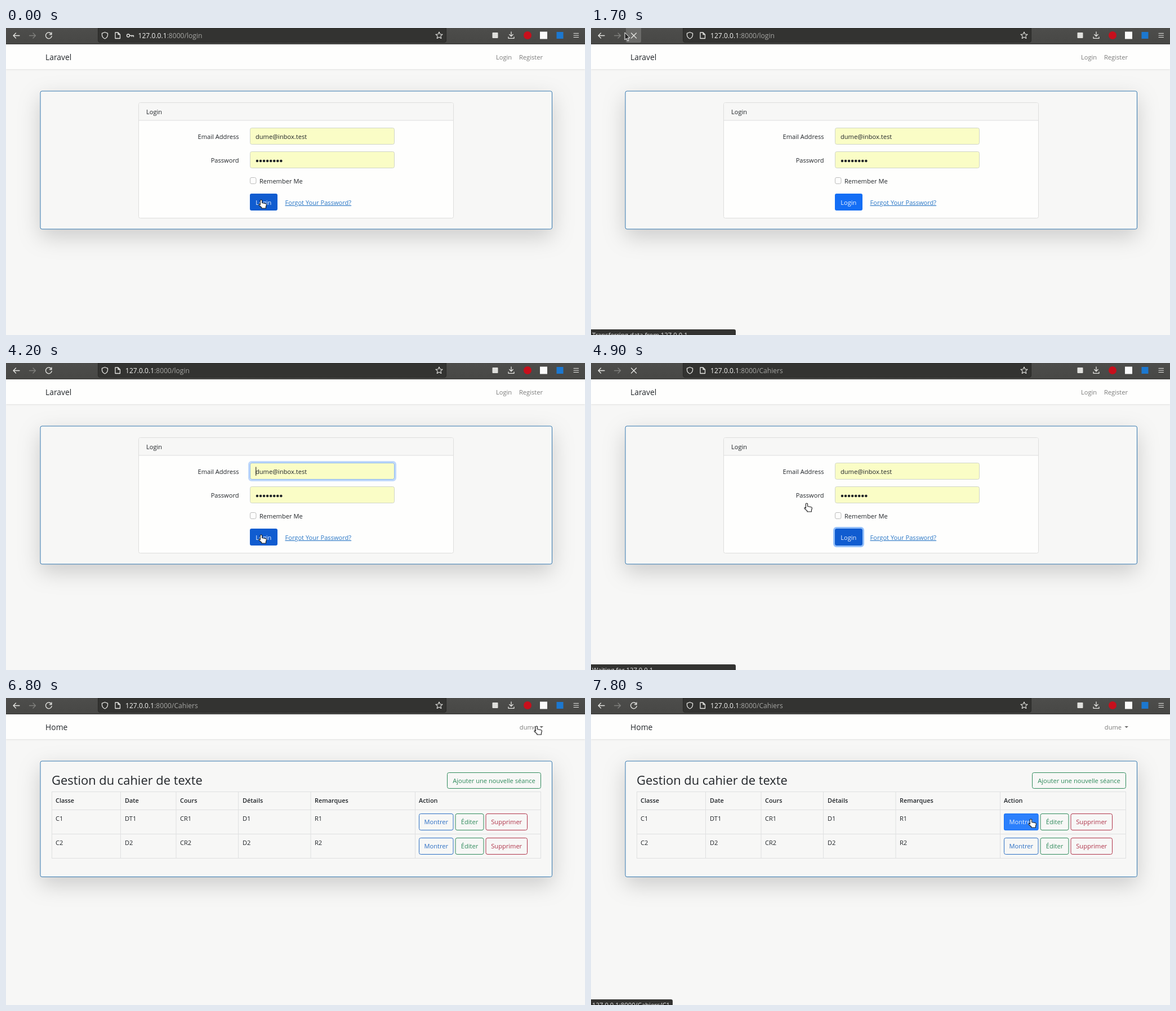
An HTML page that plays this animation: 1028x545 px, repeating every 8 s.

```html
<!DOCTYPE html>
<html lang="fr">
<head>
<meta charset="utf-8">
<title>Cahier de texte</title>
<style>
html, body { margin: 0; width: 100%; height: 100%; overflow: hidden; background: #f7f7f6; }
svg { display: block; width: 100vw; height: 100vh; }
text { font: 11.1px "Open Sans", "Noto Sans", sans-serif; fill: #212529; white-space: pre; }
.mid { text-anchor: middle; }
.end { text-anchor: end; }
.brand { font-size: 13.9px; }
.muted { fill: #7b7b7a; }
.title { font-size: 21.9px; }
.heads text { font-size: 10.9px; font-weight: 600; }
.url { font-size: 12.1px; fill: #a5a5a2; }
.url tspan { fill: #f4f4f2; }
.status text { font-size: 11.3px; fill: #eee; }
.status rect { fill: #333331; }
.line { fill: none; stroke: #e6e6e3; stroke-width: 1.3; stroke-linecap: round; stroke-linejoin: round; }
.card { fill: #f7f7f6; stroke: #3578b0; filter: drop-shadow(0 13px 19px rgba(0,0,0,.175)); }
.field { fill: #fafdc6; stroke: #d0d5c8; }
.grid { fill: none; stroke: #dfe0e1; }
.blue { --c: #2c6fc4; --f: #0d6efd; }
.green { --c: #2f8a5b; --f: #198754; }
.red { --c: #b0344a; --f: #dc3545; }
.btn rect { fill: none; stroke: var(--c); }
.btn text { fill: var(--c); }
.btn .fill rect { fill: var(--f); stroke: none; }
.btn .fill text { fill: #fff; }

/* One loop is 8 s; 1.25% is one 100 ms step. */
.a { animation: 8s step-end infinite; }
@keyframes login-page { 0% { opacity: 1 } 62.5%, 100% { opacity: 0 } }
@keyframes home-page { 0% { opacity: 0 } 62.5%, 100% { opacity: 1 } }
@keyframes url-key { 0% { opacity: 1 } 18.75%, 100% { opacity: 0 } }
@keyframes url-login { 0% { opacity: 0 } 18.75% { opacity: 1 } 57.5%, 100% { opacity: 0 } }
@keyframes url-home { 0% { opacity: 0 } 57.5%, 100% { opacity: 1 } }
@keyframes reload { 0% { opacity: 1 } 18.75% { opacity: 0 } 28.75% { opacity: 1 } 55% { opacity: 0 } 71.25%, 100% { opacity: 1 } }
@keyframes stop { 0% { opacity: 0 } 18.75% { opacity: 1 } 28.75% { opacity: 0 } 55% { opacity: 1 } 71.25%, 100% { opacity: 0 } }
@keyframes glow { 0% { opacity: 0 } 16.25% { opacity: 1 } 25%, 100% { opacity: 0 } }
@keyframes waiting { 0% { opacity: 0 } 18.75% { opacity: 1 } 20% { opacity: 0 } 55% { opacity: 1 } 62.5%, 100% { opacity: 0 } }
@keyframes transfer { 0% { opacity: 0 } 20% { opacity: 1 } 28.75% { opacity: 0 } 62.5% { opacity: 1 } 67.5%, 100% { opacity: 0 } }
@keyframes link-add { 0% { opacity: 0 } 78.75% { opacity: 1 } 81.25% { opacity: 0 } 91.25% { opacity: .1 } 92.5%, 100% { opacity: 0 } }
@keyframes link-show { 0% { opacity: 0 } 96.25%, 100% { opacity: 1 } }
@keyframes focus { 0% { opacity: 0 } 28.75% { opacity: 1 } 53.75%, 100% { opacity: 0 } }
@keyframes submit { 0% { fill: #105cd0 } 3.75% { fill: #1266e4 } 5% { fill: #146ef5 } 41.25%, 100% { fill: #105cd0 } }
@keyframes submit-ring { 0% { opacity: 0 } 53.75%, 100% { opacity: 1 } }
@keyframes add { 0% { opacity: 0 } 76.25% { opacity: .3 } 77.5% { opacity: .9 } 78.75% { opacity: 1 } 80% { opacity: .4 } 81.25% { opacity: 0 } 91.25% { opacity: .12 } 92.5%, 100% { opacity: 0 } }
@keyframes show { 0% { opacity: 0 } 95% { opacity: .25 } 96.25% { opacity: .65 } 97.5%, 100% { opacity: .87 } }
@keyframes hand {
  0% { opacity: 1 } 3.75% { opacity: 0 } 41.25% { opacity: 1 } 62.5% { opacity: 0 }
  76.25% { opacity: 1 } 80% { opacity: 0 } 82.5% { opacity: 1 } 87.5% { opacity: 0 }
  91.25% { opacity: 1 } 92.5% { opacity: 0 } 95%, 100% { opacity: 1 }
}
@keyframes arrow {
  0% { opacity: 0 } 3.75% { opacity: 1 } 6.25% { opacity: 0 } 8.75% { opacity: 1 } 35% { opacity: 0 }
  37.5% { opacity: 1 } 41.25% { opacity: 0 } 62.5% { opacity: 1 } 76.25% { opacity: 0 } 80% { opacity: 1 }
  82.5% { opacity: 0 } 87.5% { opacity: 1 } 91.25% { opacity: 0 } 92.5% { opacity: 1 } 95%, 100% { opacity: 0 }
}
@keyframes beam { 0% { opacity: 0 } 6.25% { opacity: 1 } 8.75% { opacity: 0 } 35% { opacity: 1 } 37.5%, 100% { opacity: 0 } }
@keyframes pointer {
  0% { transform: translate(453px, 305px) }
  2.5% { transform: translate(453px, 305px); animation-timing-function: steps(3) }
  6.25% { transform: translate(239px, 15px) }
  7.5% { transform: translate(239px, 15px); animation-timing-function: steps(3) }
  11.25% { transform: translate(128px, 3px) }
  12.5% { transform: translate(128px, 3px); animation-timing-function: steps(4) }
  17.5% { transform: translate(75px, 12px) }
  20% { transform: translate(75px, 12px) }
  21.25% { transform: translate(60px, 8px) }
  23.75% { transform: translate(60px, 8px); animation-timing-function: steps(9) }
  35% { transform: translate(683px, 191px) }
  36.25% { transform: translate(512px, 231px); animation-timing-function: steps(4) }
  41.25% { transform: translate(453px, 305px) }
  56.25% { transform: translate(453px, 305px); animation-timing-function: steps(4) }
  61.25% { transform: translate(383px, 249px); animation-timing-function: steps(6) }
  68.75% { transform: translate(437px, 158px) }
  70% { transform: translate(437px, 158px); animation-timing-function: steps(2) }
  72.5% { transform: translate(780px, 124px) }
  73.75% { transform: translate(780px, 124px); animation-timing-function: steps(3) }
  77.5% { transform: translate(850px, 146px) }
  78.75% { transform: translate(850px, 146px); animation-timing-function: steps(3) }
  82.5% { transform: translate(957px, 60px); animation-timing-function: steps(2) }
  85% { transform: translate(942px, 50px); animation-timing-function: steps(4) }
  90% { transform: translate(905px, 128px) }
  91.25% { transform: translate(839px, 158px); animation-timing-function: steps(3) }
  95%, 100% { transform: translate(781px, 215px) }
}
</style>
</head>
<body>
<svg viewBox="0 0 1028 545">
  <defs>
    <linearGradient id="bar" x2="0" y2="1"><stop stop-color="#4d4d4b"/><stop offset="1" stop-color="#474745"/></linearGradient>
  </defs>
  <rect width="1028" height="545" fill="#f7f7f6"/>
  <rect y="29" width="1028" height="44" fill="#fefefd" style="filter:drop-shadow(0 1.6px 1.6px rgba(0,0,0,.09))"/>

  <!-- Browser bar -->
  <rect width="1028" height="29" fill="url(#bar)"/>
  <rect y="28" width="1028" height="1" fill="#393937"/>
  <path d="M163.5 0V22Q163.5 25.5 167 25.5H778Q781.5 25.5 781.5 22V0Z" fill="#333331" stroke="#282826"/>
  <rect class="a" style="animation-name:glow" x="62" y="-4" width="27" height="30" rx="3" fill="#6b6b69"/>
  <g class="line">
    <path d="M24 13.5H13M17.5 9L13 13.5L17.5 18"/>
    <path d="M41.5 13.5H52.5M48 9L52.5 13.5L48 18" stroke="#80807d"/>
    <path class="a" style="animation-name:reload" d="M80.5 10.5A5.4 5.4 0 1 0 81.2 14.5M81 8V11.5H77.5"/>
    <path class="a" style="animation-name:stop" d="M71.5 9L80.5 18M80.5 9L71.5 18"/>
    <path d="M175.5 7.5L180.5 9.3V12.5Q180.2 17 175.5 19Q170.8 17 170.5 12.5V9.3Z"/>
    <path d="M194 8H199L202.5 11.5V18.5H194ZM199 8V11.5H202.5"/>
    <path class="a" style="animation-name:url-key" d="M219.5 13.5A2.5 2.5 0 1 0 214.5 13.5A2.5 2.5 0 1 0 219.5 13.5H226.5V15.5M223.5 13.5V15"/>
    <path d="M769 7L770.8 11L775 11.4L771.8 14.2L772.8 18.5L769 16.2L765.2 18.5L766.2 14.2L763 11.4L767.2 11Z" stroke-width="1.1"/>
    <path d="M897 7V14.5M893.8 11.5L897 14.7L900.2 11.5M892 16V18.3H902V16"/>
    <path d="M1008 9.5H1016.5M1008 13H1016.5M1008 16.5H1016.5" stroke-width="1.2"/>
  </g>
  <rect x="863.5" y="8" width="10" height="10" rx="1" fill="#dfdfdc"/>
  <circle cx="926" cy="13" r="7" fill="#c80f1c"/>
  <rect x="948" y="6.5" width="13" height="13" fill="#fafafa"/>
  <rect x="977.5" y="7" width="12" height="12" fill="#1c78d0"/>
  <text class="url a" style="animation-name:url-key" x="234.5" y="18"><tspan>127.0.0.1</tspan>:8000/login</text>
  <text class="url a" style="animation-name:url-login" x="212" y="18"><tspan>127.0.0.1</tspan>:8000/login</text>
  <text class="url a" style="animation-name:url-home" x="212" y="18"><tspan>127.0.0.1</tspan>:8000/Cahiers</text>

  <!-- Login page -->
  <g class="a" style="animation-name:login-page">
    <text class="brand" x="70" y="57">Laravel</text>
    <text class="muted" x="870" y="56">Login</text>
    <text class="muted" x="911" y="56">Register</text>
    <rect class="card" x="61" y="112" width="908.5" height="245" rx="3"/>
    <rect x="235.5" y="132.5" width="559" height="205" rx="3" fill="#fefefd" stroke="#dededd"/>
    <path d="M236 164V135.5Q236 133 238.5 133H791.5Q794 133 794 135.5V164Z" fill="#f7f7f6"/>
    <path d="M236 164H794" stroke="#dededd"/>
    <text x="249" y="153">Login</text>
    <text class="end" x="413.5" y="196.5">Email Address</text>
    <text class="end" x="413.5" y="239">Password</text>
    <rect class="field" x="433.5" y="177.5" width="256" height="29" rx="3"/>
    <rect class="field" x="433.5" y="219.5" width="256" height="29" rx="3"/>
    <g class="a" style="animation-name:focus" fill="none">
      <rect x="431.5" y="175.5" width="260" height="33" rx="4.5" stroke="#bfd8fb" stroke-width="3"/>
      <rect x="433.5" y="177.5" width="256" height="29" rx="3" stroke="#8bb8ee"/>
      <path d="M443.8 184.5V200" stroke="#111"/>
    </g>
    <text x="443" y="196.5">dume@inbox.test</text>
    <path d="M446 236H489" stroke="#212529" stroke-width="4.6" stroke-linecap="round" stroke-dasharray="0 6.05"/>
    <rect x="433.5" y="265.5" width="10.5" height="11" rx="2.5" fill="#fefefd" stroke="#bcbcbb"/>
    <text x="450" y="275.5" font-size="11">Remember Me</text>
    <rect class="a" style="animation-name:submit-ring" x="431.5" y="292.5" width="52" height="33" rx="4.5" fill="none" stroke="#94c0fa" stroke-width="3"/>
    <rect class="a" style="animation-name:submit" x="433" y="294" width="49" height="30" rx="3"/>
    <text class="mid" x="457.3" y="313.8" style="fill:#eef4ff">Login</text>
    <text x="495.5" y="313.8" style="fill:#2a77c6" text-decoration="underline">Forgot Your Password?</text>
  </g>

  <!-- Lesson list -->
  <g class="a" style="animation-name:home-page">
    <text class="brand" x="70" y="57">Home</text>
    <text class="muted end" x="942" y="56">dume</text>
    <path d="M947.5 50H954L950.7 53.3Z" fill="#6d6d6c"/>
    <rect class="card" x="61" y="112" width="908.5" height="205.5" rx="3"/>
    <text class="title" x="81" y="153.5">Gestion du cahier de texte</text>
    <path class="grid" d="M81 166.5H950M81 198.5H950M81 241.5H950M81 284.5H950M81.5 166V285M203.5 166V285M302 166V285M412.5 166V285M541 166V285M726.5 166V285M949.5 166V285"/>
    <g class="heads">
      <text x="88" y="186">Classe</text><text x="211" y="186">Date</text><text x="309" y="186">Cours</text>
      <text x="420" y="186">Détails</text><text x="548" y="186">Remarques</text><text x="733" y="186">Action</text>
    </g>
    <text x="88" y="218">C1</text><text x="211" y="218">DT1</text><text x="309" y="218">CR1</text><text x="420" y="218">D1</text><text x="548" y="218">R1</text>
    <text x="88" y="261">C2</text><text x="211" y="261">D2</text><text x="309" y="261">CR2</text><text x="420" y="261">D2</text><text x="548" y="261">R2</text>
    <g class="btn green">
      <rect x="783.5" y="132.5" width="166" height="28" rx="3"/>
      <text class="mid" x="866.5" y="151">Ajouter une nouvelle séance</text>
      <g class="fill a" style="animation-name:add">
        <rect x="783.5" y="132.5" width="166" height="28" rx="3"/>
        <text class="mid" x="866.5" y="151">Ajouter une nouvelle séance</text>
      </g>
    </g>
    <g id="actions">
      <g class="btn blue"><rect x="733.5" y="205.5" width="60.5" height="29" rx="3"/><text class="mid" x="763.7" y="224">Montrer</text></g>
      <g class="btn green"><rect x="798" y="205.5" width="50" height="29" rx="3"/><text class="mid" x="823" y="224">Éditer</text></g>
      <g class="btn red"><rect x="852" y="205.5" width="73.5" height="29" rx="3"/><text class="mid" x="888.7" y="224">Supprimer</text></g>
    </g>
    <use href="#actions" y="43"/>
    <g class="btn blue">
      <g class="fill a" style="animation-name:show">
        <rect x="733" y="205" width="61.5" height="30" rx="3"/>
        <text class="mid" x="763.7" y="224">Montrer</text>
      </g>
    </g>
  </g>

  <!-- Status line -->
  <g class="status">
    <g class="a" style="animation-name:waiting"><rect x="-4" y="535" width="261" height="20" rx="3"/><text x="2" y="549">Waiting for 127.0.0.1…</text></g>
    <g class="a" style="animation-name:transfer"><rect x="-4" y="535" width="261" height="20" rx="3"/><text x="2" y="549">Transferring data from 127.0.0.1…</text></g>
    <g class="a" style="animation-name:link-add"><rect x="-4" y="535" width="170" height="20" rx="3"/><text x="2" y="549">127.0.0.1:8000/Cahiers/create</text></g>
    <g class="a" style="animation-name:link-show"><rect x="-4" y="535" width="149" height="20" rx="3"/><text x="2" y="549">127.0.0.1:8000/Cahiers/C1</text></g>
  </g>

  <!-- Pointer, hot spot at its own origin -->
  <g class="a" style="animation-name:pointer">
    <path class="a" style="animation-name:hand" fill="#fff" stroke="#1c1c1c" stroke-width="1.1" stroke-linejoin="round"
      d="M-1.6 9V1.4Q-1.6 0 0 0T1.6 1.4V5.5L8 6.8Q9.6 7.2 9.4 9L8.4 12.5V15H.8V13.5L-3.8 9.6Q-4.4 7.6-2.8 7.6Z"/>
    <path class="a" style="animation-name:arrow" fill="#222" stroke="#fff" stroke-width="1" stroke-linejoin="round"
      d="M0 0V13L3 10.4L5 15L7 14.1L5.1 9.7H9Z"/>
    <g class="a" style="animation-name:beam" fill="none">
      <path d="M-3-6.5H3M0-6.5V6.5M-3 6.5H3" stroke="#fff" stroke-width="2.6" opacity=".7"/>
      <path d="M-2.5-6.5H2.5M0-6.5V6.5M-2.5 6.5H2.5" stroke="#1c1c1c" stroke-width="1.2"/>
    </g>
  </g>
</svg>
</body>
</html>
```
